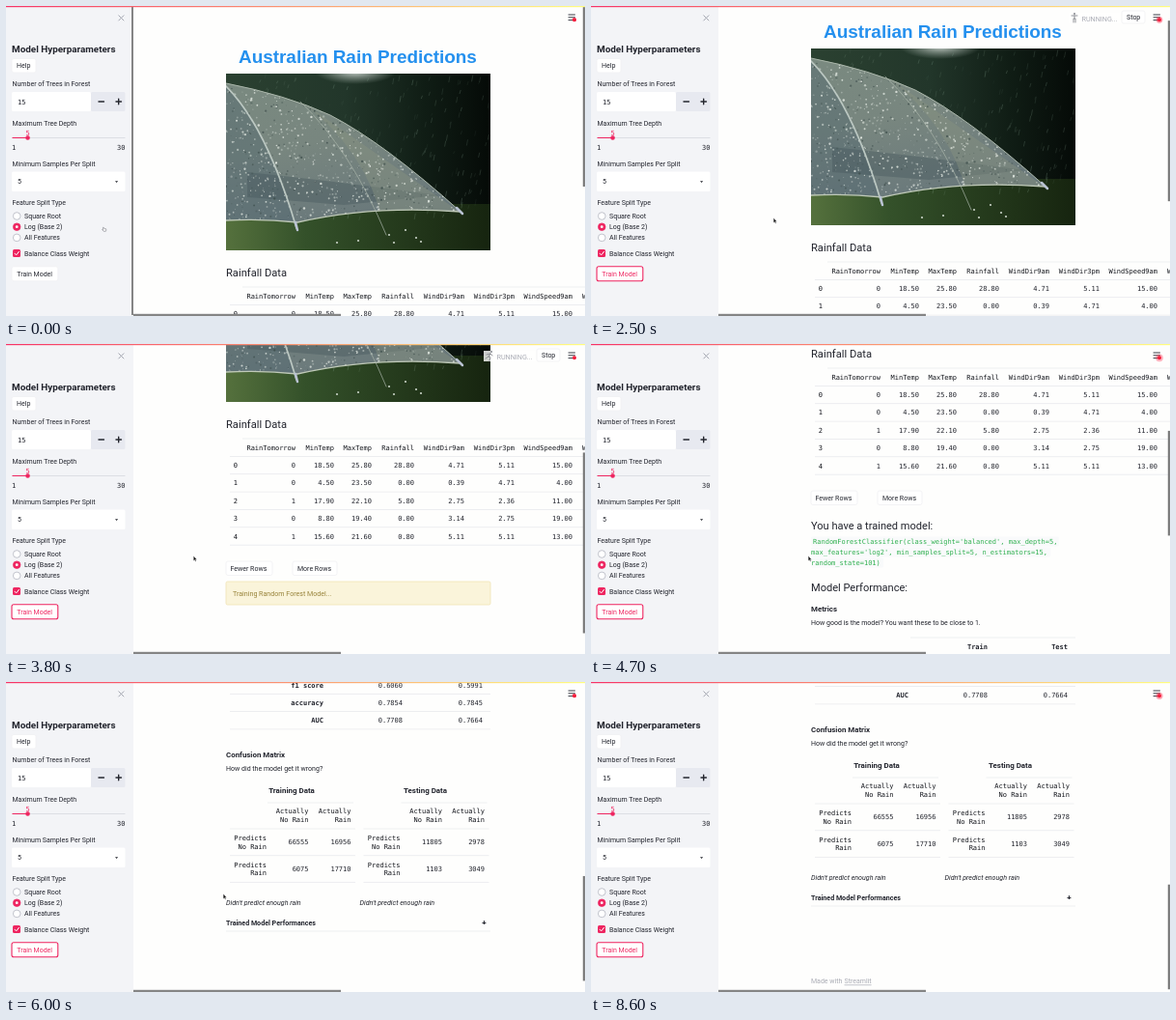
Animation of 600 by 321 pixels, one loop 8700 ms. Source, as an HTML page:

```html
<!DOCTYPE html>
<html lang="en">
<head>
<meta charset="utf-8">
<title>Rain predictions</title>
<style>
  html, body { margin: 0; width: 100%; height: 100%; overflow: hidden; background: #fefefd; }
  svg { display: block; width: 100vw; height: 100vh; }
  text { font: 7px Roboto, sans-serif; fill: #22242d; white-space: pre; }
  .mono { font-family: "DejaVu Sans Mono", monospace; }
  .head { fill: #11131a; }
  .bold { font-weight: 700; }
  .title { font-family: "Liberation Sans", Arial, sans-serif; font-weight: 700; fill: #2490ee; }
  .italic { font-style: italic; }
  .code { fill: #2fb04f; }
  .pink { fill: #ee2560; }
  .soft { fill: #a9abb4; }
  .warn { fill: #98833a; }
</style>
</head>
<body>
<svg id="stage" viewBox="0 0 600 321">
  <defs>
    <linearGradient id="bar"><stop stop-color="#f63366"/><stop offset="1" stop-color="#fffd80"/></linearGradient>
    <linearGradient id="garden">
      <stop stop-color="#2b4131"/><stop offset=".45" stop-color="#22362a"/>
      <stop offset=".75" stop-color="#101d15"/><stop offset="1" stop-color="#050a07"/>
    </linearGradient>
    <linearGradient id="lawn">
      <stop stop-color="#55713d"/><stop offset=".3" stop-color="#34512a"/><stop offset="1" stop-color="#16240f"/>
    </linearGradient>
    <linearGradient id="cloth" x2=".3" y2="1">
      <stop stop-color="#7a8a80"/><stop offset=".45" stop-color="#78867f"/><stop offset="1" stop-color="#66757a"/>
    </linearGradient>
    <radialGradient id="sky">
      <stop stop-color="#e3e9e4" stop-opacity=".85"/><stop offset="1" stop-color="#b4c2b8" stop-opacity="0"/>
    </radialGradient>
    <clipPath id="photoBox"><rect x="228" y="70" width="274" height="183"/></clipPath>
    <clipPath id="canopy"><path d="M228 80Q290 92 336 113Q392 142 471 213Q380 206 302 224Q265 220 228 222Z"/></clipPath>
    <clipPath id="mainBox"><rect x="132" width="468" height="321"/></clipPath>
  </defs>
  <g clip-path="url(#mainBox)">
    <g id="page">
      <g id="photo" clip-path="url(#photoBox)"></g>
      <g id="intro"></g>
      <g id="training"></g>
      <g id="results"></g>
    </g>
  </g>
  <g id="chrome"></g>
  <g id="side"></g>
  <g id="cursor"></g>
</svg>
<script>
const LOOP = 8700, CLICK = 900, TRAINED = 3900, LEAVE = 1700;
const $ = id => document.getElementById(id);
let layer;

function add(tag, attrs, content = '') {
  const node = document.createElementNS('http://www.w3.org/2000/svg', tag);
  for (const key in attrs) node.setAttribute(key, attrs[key]);
  node.textContent = content;
  return layer.appendChild(node);
}
// y is the middle of the capitals
function label(x, y, content, cls = '', size = 7, anchor = 'start') {
  return add('text', { x, y: y + size * .355, class: cls, style: `font-size:${size}px`, 'text-anchor': anchor }, content);
}
const right = (x, y, content, cls = 'mono') => label(x, y, content, cls, 7, 'end');
const box = (x, y, width, height, fill, rx = 0, stroke = 'none') =>
  add('rect', { x, y, width, height, fill, rx, stroke, 'stroke-width': .8 });
const stroke = (d, color, width = 1) =>
  add('path', { d, fill: 'none', stroke: color, 'stroke-width': width, 'stroke-linecap': 'round', 'stroke-linejoin': 'round' });
const dot = (cx, cy, r, fill, line = 'none') => add('circle', { cx, cy, r, fill, stroke: line, 'stroke-width': .7 });
const rule = (x1, x2, y) => box(x1, y - .35, x2 - x1, .7, '#e6e7eb');
function button(x, y, width, height, content, textX) {
  const frame = box(x, y, width, height, '#fff', 2, '#f0f0f3');
  return [frame, label(textX, y + height / 2, content)];
}

function drawPhoto() {
  layer = $('photo');
  let seed = 7;
  const rnd = () => (seed = seed * 16807 % 2147483647) / 2147483647;
  box(228, 70, 274, 183, 'url(#garden)');
  add('ellipse', { cx: 362, cy: 68, rx: 42, ry: 13, fill: 'url(#sky)' });
  box(228, 205, 274, 48, 'url(#lawn)');
  for (let i = 0; i < 240; i++) {
    const x = 250 + rnd() * 252, y = 70 + rnd() * 150;
    stroke(`M${x} ${y}l-1 ${2 + rnd() * 4}`, `rgba(150,180,160,${rnd() * .35})`, .7);
  }
  layer = add('g', { 'clip-path': 'url(#canopy)' });
  box(228, 70, 274, 183, 'url(#cloth)');
  add('path', { d: 'M228 83Q270 125 301 230H228Z', fill: '#4c626c', opacity: .4 });
  add('path', { d: 'M250 172Q330 180 450 196L350 206L250 198Z', fill: '#44565a', opacity: .4 });
  add('path', { d: 'M305 98Q375 150 392 230L480 220Z', fill: '#8b957f', opacity: .4 });
  for (let i = 0; i < 1300; i++) {
    const light = rnd() < .75;
    add('circle', { cx: 228 + rnd() * 240, cy: 80 + rnd() * 145, r: .3 + rnd() * .9,
      fill: light ? '#eef3ec' : '#3c4c4a', opacity: .2 + rnd() * .6 });
  }
  layer = $('photo');
  stroke('M228 80Q290 92 336 113Q392 142 471 213', '#aab6aa', 1);
  stroke('M228 222Q265 220 302 224Q380 206 471 213', '#bfc9b8', 1.3);
  stroke('M228 83Q270 125 301 230', '#bcc8c2', 1.7);
  stroke('M305 99Q358 150 394 237', '#aab5aa', .7);
  stroke('M300 224l2 8M467 209l6 6', '#b9c2d2', 2.5);
  for (const [x, y] of [[397, 237], [402, 245], [414, 232], [425, 240], [430, 244], [365, 243], [343, 245]])
    dot(x, y, 1.1, '#c9d3c6');
}

function drawIntro() {
  layer = $('intro');
  label(241, 52.7, 'Australian Rain Predictions', 'title', 18.92);
  label(228, 276, 'Rainfall Data', '', 11.15);
  const edges = [240, 300, 340, 379, 423, 475, 527, 587];
  const rows = [
    ' RainTomorrow MinTemp MaxTemp Rainfall WindDir9am WindDir3pm WindSpeed9am',
    '0 0 18.50 25.80 28.80 4.71 5.11 15.00',
    '1 0 4.50 23.50 0.00 0.39 4.71 4.00',
    '2 1 17.90 22.10 5.80 2.75 2.36 11.00',
    '3 0 8.80 19.40 0.00 3.14 2.75 19.00',
    '4 1 15.60 21.60 0.80 5.11 5.11 13.00'];
  rule(245, 600, 291);
  rows.forEach((row, i) => {
    const y = 300.3 + i * 18.35;
    row.split(' ').forEach((cell, k) => right(edges[k], y, cell, i && k ? 'mono' : 'mono head'));
    rule(232, 600, y + 9.1);
  });
  label(597, 300.3, 'W', 'mono head');
  button(228, 418, 48, 14.5, 'Fewer Rows', 232.5);
  button(297, 418, 46, 14.5, 'More Rows', 302);
}

function drawTraining() {
  layer = $('training');
  box(228, 439, 274, 24, '#faf4da', 1.5, '#f0e4b4');
  label(235, 451.3, 'Training Random Forest Model...', 'warn', 7.1);
}

function confusion(x, name, cells) {
  const inner = x + 85.5, outer = x + 129.5;
  label(x + 68, 707, name, 'bold', 7.95, 'middle');
  rule(x + 43, x + 132, 719.5);
  for (const [edge, kind] of [[inner, 'No Rain'], [outer, 'Rain']]) {
    right(edge, 728.5, 'Actually', 'mono head');
    right(edge, 737, kind, 'mono head');
  }
  rule(x + 4, x + 134, 746.5);
  ['No Rain', 'Rain'].forEach((kind, i) => {
    const y = 756.3 + i * 27.5;
    right(x + 42, y, 'Predicts', 'mono head');
    right(x + 42, y + 8.5, kind, 'mono head');
    right(inner, y + 4.2, cells[i][0]);
    right(outer, y + 4.2, cells[i][1]);
    rule(x + 4, x + 134, y + 18);
  });
}

function drawResults() {
  layer = $('results');
  label(228, 454, 'You have a trained model:', '', 11.05);
  const code = ["RandomForestClassifier(class_weight='balanced', max_depth=5,",
    "max_features='log2', min_samples_split=5, n_estimators=15,", 'random_state=101)'];
  code.forEach((line, i) => {
    const x = i ? 228 : 230, y = 470.5 + i * 11;
    box(228, y - 5, line.length * 4.23 + 3, 10, '#f9fafb', 1);
    label(x, y, line, 'mono code', 7.03);
  });
  label(228, 518.5, 'Model Performance:', '', 11.05);
  label(228, 540.5, 'Metrics', 'bold', 7.9);
  label(228, 555, 'How good is the model? You want these to be close to 1.');
  rule(331, 502, 570);
  [['', 'Train', 'Test'], ['f1 score', '0.6060', '0.5991'], ['accuracy', '0.7854', '0.7845'], ['AUC', '0.7708', '0.7664']]
    .forEach((row, i) => {
      const y = 579.3 + i * 18.3;
      row.forEach((cell, k) => right([329, 411, 494][k], y, cell, i && k ? 'mono' : 'mono bold'));
      rule(232, 502, y + 9.2);
    });
  label(228, 669.5, 'Confusion Matrix', 'bold', 7.9);
  label(228, 684.5, 'How did the model get it wrong?');
  confusion(228, 'Training Data', [['66555', '16956'], ['6075', '17710']]);
  confusion(366.5, 'Testing Data', [['11805', '2978'], ['1103', '3049']]);
  for (const x of [228, 366.5]) label(x, 823, "Didn't predict enough rain", 'italic', 7.1);
  label(228, 843.7, 'Trained Model Performances', 'bold', 7.1);
  label(495.5, 843.7, '+', 'bold', 8, 'middle');
  rule(228, 502, 852.5);
  label(228, 930.5, 'Made with ', 'soft');
  label(262.5, 930.5, 'Streamlit', 'soft').setAttribute('text-decoration', 'underline');
}

const poses = [
  'M-4 2q2-2 4 0t4 0M-3-1l3-1 3 2M-3-3l2 1',
  'M1-2l-2 3 2 1-1 3M-1 1l-3 2M-3-1l4-1 2 2',
  'M-3-2h6M0-2v3M-1 5V1h2v4',
  'M-1-2v3h3l1 2M-1-1l3-1M-2 0a2 2 0 1 0 3 3'];
const heads = [[3, -2], [2, -4], [0, -4], [1, -4]];
let running, figure, face, glow, thumb, sideThumb, trainButton, hand, arrow;

function drawChrome() {
  layer = $('chrome');
  box(132, 318.8, 215, 2.2, '#858585');
  thumb = box(597.8, 0, 2.2, 187, '#7d7d7d');
  running = layer = add('g', {});
  box(495, 7, 55, 11, 'rgba(255,255,255,.8)');
  figure = stroke(poses[0], '#85878e', .9);
  face = dot(0, 0, 1, '#85878e');
  label(508.5, 13.6, 'RUNNING...', 'soft', 7.2);
  button(550, 5, 24, 13, 'Stop', 555);
  layer = $('chrome');
  stroke('M583 9h6.5M583 11.8h6.5M583 14.6h6.5', '#3a3c46', 1);
  glow = dot(589, 14.3, 2, '#ff2b4b');
  dot(589, 14.3, 2, '#f4203e');
}

function drawSide() {
  layer = $('side');
  box(0, 0, 132, 321, '#f3f4f7');
  sideThumb = box(130, 0, 2, 320, '#858585');
  stroke('M116.8 9.8l5.2 5.2M122 9.8l-5.2 5.2', '#a3a6b0', 1);
  label(6, 44.1, 'Model Hyperparameters', 'bold', 9.9);
  button(6, 54.5, 25, 14.5, 'Help', 11);
  label(6.5, 81, 'Number of Trees in Forest');
  box(6, 89, 82, 20, '#fff', 1.5);
  box(88, 89, 35.5, 20, '#e7e9f0', 1.5);
  label(12, 99.2, '15', 'mono');
  stroke('M96 99h5.5M114 99h5.5M116.7 96.2v5.6', '#25272f', 1.4);
  label(6.5, 121.2, 'Maximum Tree Depth');
  box(6.5, 136.1, 117, .7, '#d3d6dd');
  box(6.5, 136, 16, 1, '#ee2560');
  dot(22.5, 136.5, 2.3, '#ee2560');
  label(22.5, 131.8, '5', 'mono pink', 7, 'middle');
  label(6, 146.3, '1', 'mono');
  right(123.5, 146.3, '30');
  label(6.5, 163.2, 'Minimum Samples Per Split');
  box(6, 171.5, 117.5, 20.5, '#fff', 1.5);
  label(12, 182, '5');
  add('path', { d: 'M113 181.3h3.2l-1.6 1.8z', fill: '#25272f' });
  label(6.5, 203.9, 'Feature Split Type');
  ['Square Root', 'Log (Base 2)', 'All Features'].forEach((name, i) => {
    const y = 217.5 + i * 11.2, on = i === 1;
    dot(11.2, y, 3.8, on ? '#ee2560' : '#fff', on ? '#ee2560' : '#a9adb8');
    if (on) dot(11.2, y, 1.4, '#fff');
    label(19, y, name);
  });
  box(7, 252, 8, 8, '#ee2560', 1.5);
  stroke('M9 256.2l1.6 1.7 2.8-3.5', '#fff', 1);
  label(19, 256.1, 'Balance Class Weight');
  trainButton = button(6, 269.8, 47.8, 15, 'Train Model', 11.3);
  box(0, 0, 600, 1.2, 'url(#bar)');
}

function drawCursor() {
  layer = $('cursor');
  hand = add('path', { d: 'M-1.6-1.6q.6-.6 1 0l.3 1 2 .4q.5 1.3-.3 2.5h-2.2l-1.6-1.8q.2-.6 1 0z', fill: '#f4f4f4', stroke: '#777a83', 'stroke-width': .55 });
  arrow = add('path', { d: 'M-.8-2.5v5l1.1-1 .8 1.7.8-.4-.8-1.6h1.5z', fill: '#111', stroke: '#fff', 'stroke-width': .3 });
}

const scrollKeys = [[2300, 0], [2500, 26], [3200, 193], [4300, 193], [4700, 266], [5400, 500], [6000, 594.5], [6400, 620.5]];
const pointerX = [[0, 102], [600, 30], [1000, 30], [1400, 111], [2000, 190], [3700, 190], [4400, 226]];
const pointerY = [[0, 231], [600, 279], [1000, 279], [1400, 256], [2000, 222]];

function at(keys, t) {
  const i = keys.findIndex(key => key[0] > t);
  if (i === 0) return keys[0][1];
  if (i < 0) return keys[keys.length - 1][1];
  const [t0, a] = keys[i - 1], [t1, b] = keys[i];
  return a + (b - a) * (t - t0) / (t1 - t0);
}
const set = (node, attrs) => { for (const key in attrs) node.setAttribute(key, attrs[key]); };
const show = (node, on) => set(node, { display: on ? 'inline' : 'none' });

function draw(now) {
  const t = Math.floor(now % LOOP / 100) * 100;
  const scroll = at(scrollKeys, t), clicked = t >= CLICK, done = t >= TRAINED, busy = clicked && !done;
  set($('page'), { transform: `translate(0 ${-scroll})` });
  show($('training'), busy);
  show($('results'), done);
  show(running, busy);

  const ratio = done ? .338 : .5826;
  set(thumb, { y: scroll * ratio, height: 321 * ratio });
  show(sideThumb, t < LEAVE);

  set(trainButton[0], { stroke: clicked ? '#ee2560' : '#f0f0f3', 'stroke-width': clicked ? 1.1 : .8 });
  set(trainButton[1], { class: clicked ? 'pink' : '' });

  const pose = Math.floor(t / 400) % 4, [hx, hy] = heads[pose];
  set(figure, { d: poses[pose], transform: 'translate(501 12)' });
  set(face, { cx: 501 + hx, cy: 12 + hy });

  const pulse = Math.min(1, t % 2000 / 1400);
  set(glow, { r: 2 + 3.8 * pulse, opacity: .7 * (1 - pulse) });

  const x = at(pointerX, t);
  set($('cursor'), { transform: `translate(${x} ${at(pointerY, t)})` });
  show($('cursor'), t < 6800);
  show(hand, x < 131);
  show(arrow, x >= 131);
}

drawPhoto();
drawIntro();
drawTraining();
drawResults();
drawChrome();
drawSide();
drawCursor();

function tick() {
  draw(performance.now());
  requestAnimationFrame(tick);
}
tick();
</script>
</body>
</html>
```
